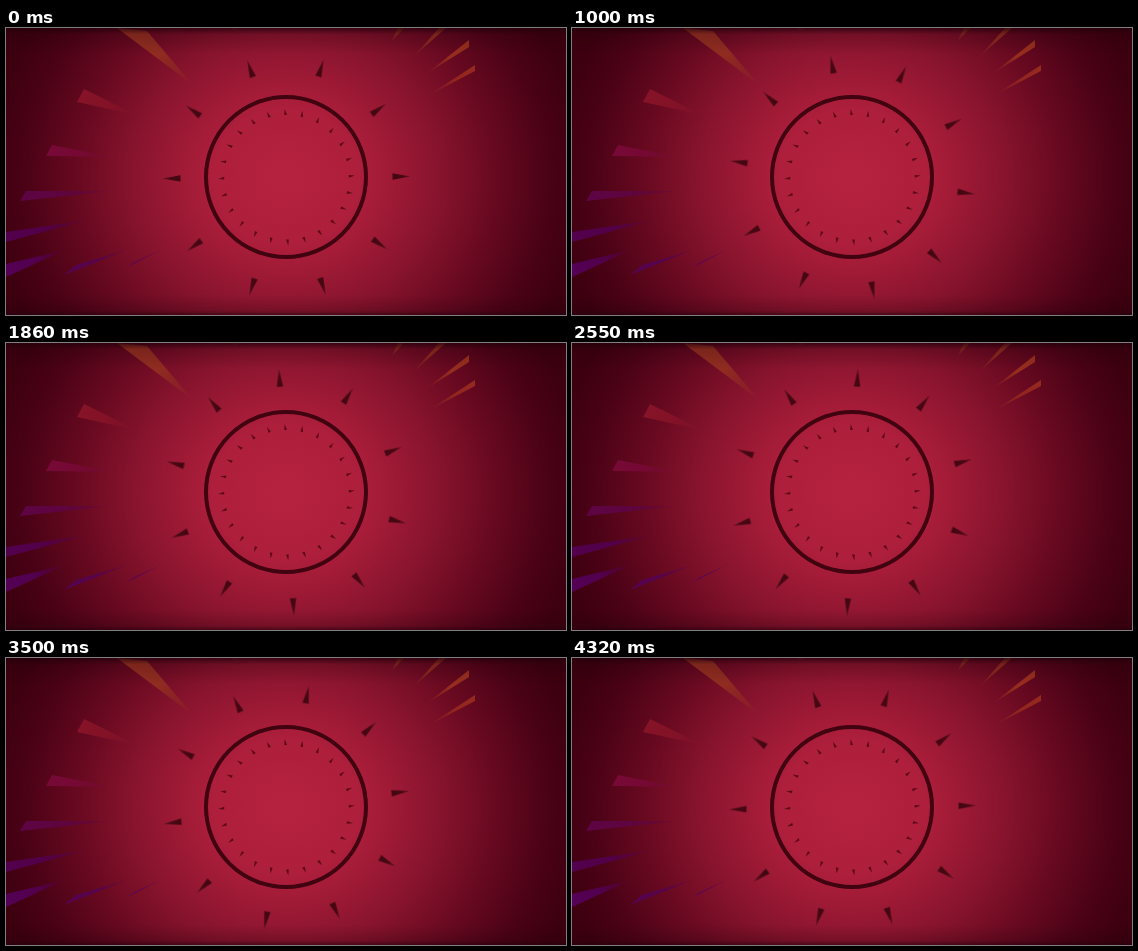
An HTML page for the animation above (4.37 s loop, 560 px wide and 287 px high).

```html
<!DOCTYPE html>
<html lang="en">
<head>
<meta charset="utf-8">
<title>Sunburst dial</title>
<style>
  html, body { margin: 0; width: 100%; height: 100%; overflow: hidden; background: #3b000e; }
  svg { display: block; width: 100vw; height: 100vh; }
  #spikes {
    transform-origin: 280.5px 149.5px;
    animation: turn 4370ms steps(96) -5ms infinite;
  }
  @keyframes turn {
    from { transform: rotate(-0.5deg); }
    to { transform: rotate(35.5deg); }
  }
</style>
</head>
<body>
<svg viewBox="0 0 560 287" preserveAspectRatio="none">
  <defs>
    <radialGradient id="glow" gradientUnits="userSpaceOnUse" cx="0" cy="0" r="300"
      gradientTransform="translate(280 149) scale(1 .92)">
      <stop offset="0" stop-color="#b5223f"/>
      <stop offset=".24" stop-color="#ae1f3c"/>
      <stop offset=".38" stop-color="#9b1934"/>
      <stop offset=".52" stop-color="#86132d"/>
      <stop offset=".7" stop-color="#670920"/>
      <stop offset=".87" stop-color="#4b0216"/>
      <stop offset="1" stop-color="#3c000f"/>
    </radialGradient>
    <linearGradient id="edge" x2="0" y2="1">
      <stop offset="0" stop-color="#20000a" stop-opacity=".75"/>
      <stop offset=".022" stop-color="#20000a" stop-opacity=".2"/>
      <stop offset=".09" stop-color="#20000a" stop-opacity="0"/>
      <stop offset=".93" stop-color="#20000a" stop-opacity="0"/>
      <stop offset=".985" stop-color="#20000a" stop-opacity=".2"/>
      <stop offset="1" stop-color="#20000a" stop-opacity=".6"/>
    </linearGradient>
    <linearGradient id="dark" x2="1" y2="0">
      <stop offset="0" stop-color="#430612"/>
      <stop offset=".55" stop-color="#480813"/>
      <stop offset="1" stop-color="#5e0e1d"/>
    </linearGradient>
  </defs>
  <rect width="560" height="287" fill="url(#glow)"/>
  <g id="rays"></g>
  <rect width="560" height="287" fill="url(#edge)"/>
  <circle cx="280" cy="149" r="80" fill="none" stroke="#40030f" stroke-width="4"/>
  <g id="ticks" fill="#5c0919"></g>
  <g id="spikes" fill="url(#dark)"></g>
</svg>
<script>
  const NS = 'http://www.w3.org/2000/svg';
  const $ = id => document.getElementById(id);

  function add(parent, tag, attrs) {
    const el = document.createElementNS(NS, tag);
    for (const key in attrs) el.setAttribute(key, attrs[key]);
    parent.appendChild(el);
    return el;
  }

  // Repeats a shape drawn on the positive x axis around a centre.
  function ring(group, count, shape, cx, cy, offset) {
    for (let i = 0; i < count; i++) {
      add(group, 'polygon', {
        points: shape,
        transform: `translate(${cx} ${cy}) rotate(${offset + i * 360 / count})`
      });
    }
  }

  ring($('spikes'), 10, '106,-3.2 106,3.2 124,0', 280.5, 149.5, 0);
  ring($('ticks'), 24, '62.3,-1.2 62.3,1.6 68.3,-.6', 280.5, 149.2, -1);

  // Two outer corners, inner tip, outer colour.
  const rays = [
    [111, 0, 141, 3, 187, 57, '#932f20'],
    [78, 61, 71, 74, 131, 87, '#861328'],
    [46, 117, 40, 128, 107, 129, '#770936'],
    [20, 163, 14, 173, 106, 163, '#5e0444'],
    [0, 204, 0, 214, 82, 192, '#53004e'],
    [0, 236, 0, 249, 59, 222, '#540056'],
    [58, 247, 70, 237, 124, 221, '#560350'],
    [120, 240, 128, 234, 159, 220, '#62074b'],
    [225, 0, 233, 0, 229, 3, '#8a2422'],
    [392, 0, 398, 0, 385, 14, '#8c2c20'],
    [433, 0, 440, 0, 407, 29, '#922d1f'],
    [463, 12, 463, 19, 420, 46, '#9a301e'],
    [469, 37, 469, 43, 423, 67, '#96291f']
  ];

  rays.forEach(([ax, ay, bx, by, tx, ty, color], i) => {
    const grad = add($('rays'), 'linearGradient', {
      id: 'ray' + i, gradientUnits: 'userSpaceOnUse',
      x1: (ax + bx) / 2, y1: (ay + by) / 2, x2: tx, y2: ty
    });
    [[0, 1], [.45, .9], [1, .1]].forEach(([offset, opacity]) =>
      add(grad, 'stop', { offset, 'stop-color': color, 'stop-opacity': opacity }));
    add($('rays'), 'polygon', {
      points: `${ax},${ay} ${bx},${by} ${tx},${ty}`,
      fill: `url(#ray${i})`
    });
  });
</script>
</body>
</html>
```
